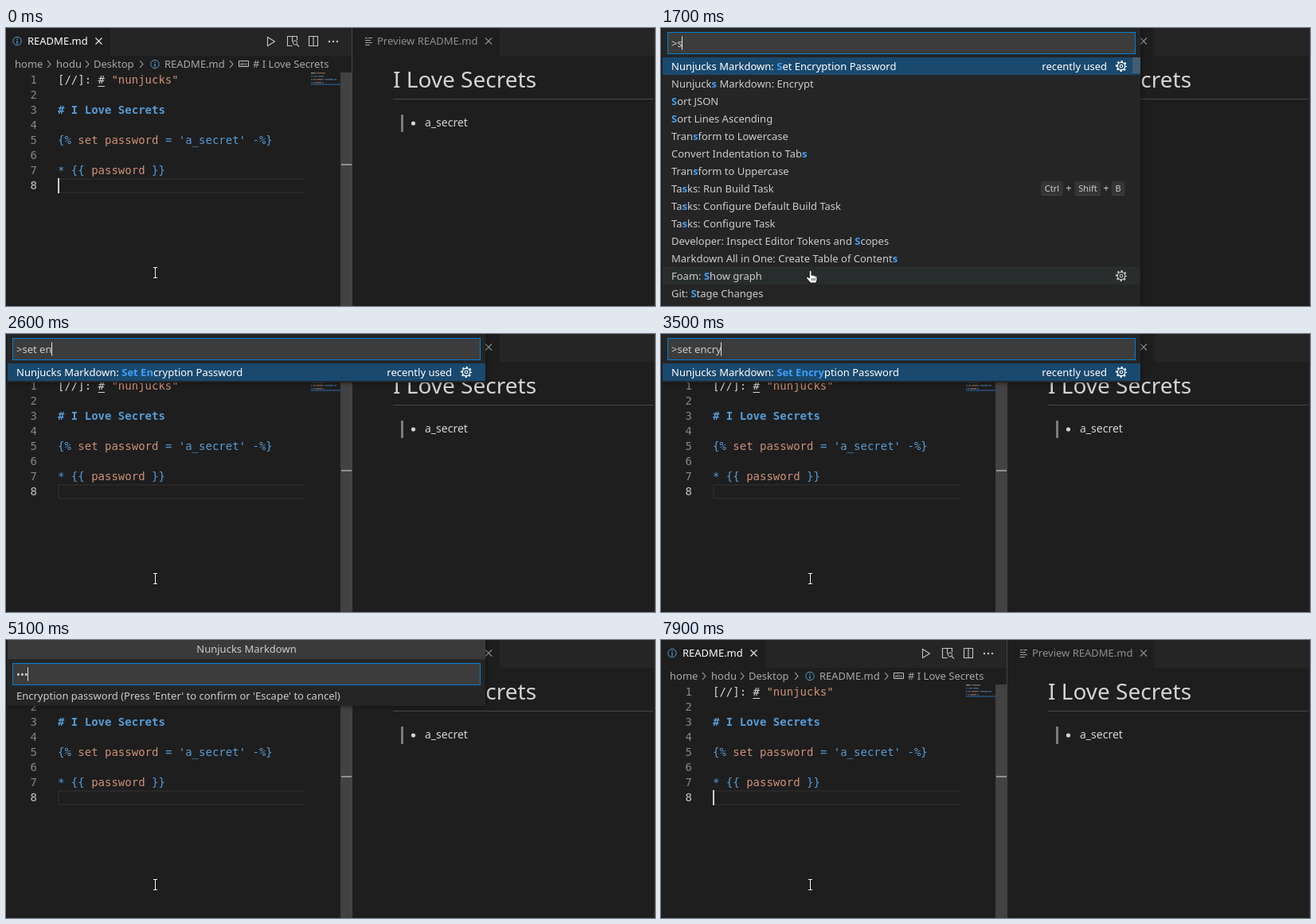
These frames come from a looping animation (815x350 px, 8000 ms). An HTML page:

```html
<!DOCTYPE html>
<html lang="en">
<head>
<meta charset="utf-8">
<title>Editor with command palette</title>
<style>
  html, body { margin: 0; width: 100%; height: 100%; overflow: hidden; background: #1e1e1e; }
  svg { display: block; width: 100%; height: 100%; }
  text { font: 13px "Noto Sans", sans-serif; fill: #ccc; white-space: pre; }
  .code { font: 14px "DejaVu Sans Mono", monospace; }
  .key { font-size: 11px; text-anchor: middle; }
  .hl { font-weight: 700; fill: #409ff8; }
  .line { fill: none; stroke: #c5c5c5; }
  .shadow { filter: drop-shadow(0 0 3px rgba(0, 0, 0, .6)); }
</style>
</head>
<body>
<svg id="stage" viewBox="0 0 815 350" xmlns="http://www.w3.org/2000/svg">
  <clipPath id="inside"><rect x="2" width="813" height="350"/></clipPath>
  <g id="base"></g>
  <g id="overlay" clip-path="url(#inside)"></g>
  <g id="pointer"></g>
</svg>
<script>
const LOOP = 8000;
const $ = id => document.getElementById(id);
const BLUE = '#569cd6', TAN = '#ce9178', PLAIN = '#d4d4d4', DIM = '#a9a9a9', TAB = '#8e8e8e';

const rect = (x, y, w, h, fill, extra = '') =>
  `<rect x="${x}" y="${y}" width="${w}" height="${h}" fill="${fill}" ${extra}/>`;
const text = (x, y, s, fill = '#ccc', extra = '') =>
  `<text x="${x}" y="${y}" style="fill:${fill}" ${extra}>${s}</text>`;
const line = (d, color = '#c5c5c5', w = 1, extra = '') =>
  `<path class="line" d="${d}" style="stroke:${color};stroke-width:${w}" ${extra}/>`;
const span = ([s, color]) => `<tspan fill="${color}">${s}</tspan>`;
const cross = (x, y, color) => line(`M${x - 4} ${y - 4}l8 8m0-8l-8 8`, color, 1.1);
const chevron = x => line(`M${x - 2} 41l4 4.5l-4 4.5`, DIM, 1.1);
const info = (x, y) =>
  `<circle class="line" cx="${x}" cy="${y}" r="5.2" style="stroke:#519fd0"/>` +
  line(`M${x} ${y - 3}v1.4m0 1v4`, '#519fd0', 1.3);

/* ---------- editor ---------- */

const code = {
  1: [['[//]: # ', PLAIN], ['"nunjucks"', TAN]],
  3: [['# I Love Secrets', BLUE]],
  5: [['{% ', BLUE], ['set password ', TAN], ["= 'a_secret' -%}", BLUE]],
  7: [['* {{ ', BLUE], ['password ', TAN], ['}}', BLUE]]
};

function codeLines() {
  let out = '';
  for (let n = 1; n <= 8; n++) {
    const y = 51 + 19 * n, top = 54 + 2 * n;
    out += text(39, y, n, n === 8 ? '#c6c6c6' : '#858585', 'class="code" text-anchor="end"');
    if (!code[n]) continue;
    out += text(65, y, code[n].map(span).join(''), PLAIN,
      `class="code" ${n === 3 ? 'font-weight="700" style="font-weight:700"' : ''}`);
    let x = 383;
    for (const [s, color] of code[n]) {
      for (const word of s.split(/( )/)) {
        if (word.trim()) out += rect(x, top, word.length, 1.5, color, 'opacity=".55"');
        x += word.length;
      }
    }
  }
  return out;
}

function toolbar() {
  return line('M328.5 11.5v11l9-5.5z', '#c5c5c5', 1.1) +
    line('M359.5 22.5h-6v-12h12v5M359.5 10.5v7', '#c5c5c5', 1.1) +
    '<circle class="line" cx="363" cy="18.5" r="2.6"/>' + line('M365 20.5l3 3', '#c5c5c5', 1.1) +
    line('M380.5 10.5h11v12h-11zM386 10.5v12', '#c5c5c5', 1.1) +
    [406, 411, 416].map(x => `<circle cx="${x}" cy="17" r="1.2" fill="#c5c5c5"/>`).join('');
}

function breadcrumb() {
  return text(11, 50, 'home', DIM) + chevron(54) + text(63, 50, 'hodu', DIM) + chevron(102) +
    text(110, 50, 'Desktop', DIM) + chevron(170) + info(187, 45.5) +
    text(199, 50, 'README.md', DIM) + chevron(283) +
    line('M292.5 41.5h12v7h-12z') +
    text(298.5, 47, 'abc', '#c5c5c5', 'text-anchor="middle" font-size="6" class="tiny"') +
    text(310, 50, '# I Love Secrets', DIM);
}

function preview() {
  return rect(435, 0, 380, 35, '#252526') + rect(435, 0, 185, 35, '#1e1e1e') +
    line('M451 12.5h3m1 0h5M451 15.5h7M451 18.5h9M451 21.5h6', '#a5a5a5') +
    text(466, 21, 'Preview README.md', TAB) + cross(606, 16.5, TAB) +
    text(486, 75, 'I Love Secrets', PLAIN, 'class="title"') +
    rect(486, 89, 327, 1, '#474747') + rect(496, 109, 3, 22, '#7b7b7b') +
    '<circle cx="511.5" cy="120" r="2.6" fill="#d4d4d4"/>' +
    text(526, 124, 'a_secret', PLAIN, 'class="body"') + rect(814, 0, 1, 350, '#303030');
}

const editor = () =>
  rect(0, 0, 815, 350, '#1e1e1e') + rect(131, 0, 304, 35, '#252526') +
  info(14, 16.5) + text(27, 21, 'README.md', '#fff') + cross(116.5, 16.5, '#e8e8e8') +
  toolbar() + breadcrumb() +
  line('M375 190H66V207H375', '#282828', 2) + codeLines() + rect(115.5, 73, 8.5, 1, PLAIN) +
  rect(383, 70, 37, 2, '#264f78', 'opacity=".8"') +
  rect(420, 56, 15, 294, '#424242') + rect(421, 171, 13, 2, '#8f8f8f') +
  rect(434, 0, 1, 350, '#444') + preview();

/* ---------- palette ---------- */

const mark = s => s.replace(/\[(.+?)\]/g, '<tspan class="hl">$1</tspan>');
const panel = h => rect(2, -10, 600, h + 10, '#252526', 'class="shadow"');
const field = (y, value) =>
  rect(8.5, y + .5, 587, 27, '#3c3c3c', 'stroke="#007fd4"') +
  `<text id="typed" x="13" y="${y + 19}">${value}</text>` +
  `<rect id="caret" y="${y + 5.5}" width="1" height="17" fill="#e0e0e0"/>`;

const gear = (y, color) => `<g class="line" style="stroke:${color}" transform="translate(578 ${y})">
  <circle r="6" stroke-width="2" stroke-dasharray="2.36" stroke-dashoffset="1.18"/>
  <circle r="4.7" stroke-width="1.2"/><circle r="1.8" stroke-width="1.1"/></g>`;

const cap = (cx, y, w, s) =>
  rect(cx - w / 2, y - 9, w, 18, '#353536', 'rx="3"') +
  rect(cx - w / 2 + 1, y + 8, w - 2, 1, '#444') + text(cx, y + 4, s, '#ccc', 'class="key"');
const plus = (x, y) => text(x, y + 4, '+', '#ccc', 'text-anchor="middle"');
const chord = {
  I: y => cap(495, y, 28, 'Ctrl') + plus(515.5, y) + cap(539, y, 33, 'Shift') + plus(562, y) + cap(576, y, 16, 'I'),
  B: y => cap(491, y, 28, 'Ctrl') + plus(512, y) + cap(536, y, 33, 'Shift') + plus(559, y) + cap(574, y, 17, 'B'),
  D: y => cap(425, y, 28, 'Ctrl') + plus(446, y) + cap(461, y, 18, 'D')
};
const keyOf = s => /^Format Doc/.test(s) ? 'I' : /Run Build/.test(s) ? 'B' : /Next Find/.test(s) ? 'D' : '';

// `split` is the row that opens the second group, `slider` the scrollbar length
function palette(value, rows, { split = 0, slider = 0, fade = 1 } = {}) {
  let out = panel(rows.length > 1 ? 360 : 61) + field(5, value) + rect(2, 37, 600, 22, '#19496f');
  rows.forEach((s, i) => {
    const mid = 48 + 22 * i, first = split && i === split;
    if (i === 12) out += rect(2, mid - 11, 600, 22, '#2a2d2e') + gear(mid, '#c5c5c5');
    if (first) out += rect(2, mid - 11, 600, 1, '#3f3f46') + text(584, mid + 6, 'other commands', '#3f94f5', 'text-anchor="end"');
    const y = mid + (first ? 1 : 0), key = keyOf(s.replace(/[\[\]]/g, ''));
    out += text(13, y + 5, mark(s), i ? '#ccc' : '#fff');
    if (key) out += chord[key](y);
  });
  out += text(560, 53, 'recently used', '#fff', 'text-anchor="end"') + gear(48, '#fff');
  if (slider) out += rect(592, 37, 10, slider, '#797979', `opacity="${.45 * fade}"`);
  return out;
}

const prompt = n =>
  panel(83) + rect(2, 0, 600, 24, '#3a3a3b') +
  text(302, 16, 'Nunjucks Markdown', '#ccc', 'text-anchor="middle"') + field(29, '•'.repeat(n)) +
  text(13, 75, "Encryption password (Press 'Enter' to confirm or 'Escape' to cancel)");

const top1 = hit => 'Nunjucks Markdown: ' + 'Set Encryption Password'.replace(hit, '[$&]');
const recent = `${top1('')}|Format Document|Nunjucks Markdown: Encrypt|Sort JSON|Sort Lines Ascending
|Transform to Lowercase|Convert Indentation to Tabs|Transform to Uppercase|Tasks: Run Build Task
|Tasks: Configure Default Build Task|Tasks: Configure Task|Developer: Inspect Editor Tokens and Scopes
|Markdown All in One: Create Table of Contents|Foam: Show graph`
  .replace(/\n/g, '').replace('[]', '').split('|');
const withS = recent.filter(s => /s/i.test(s)).map(s =>
  s.replace(/\bS|s/, m => m).replace(/\bS/.test(s) ? /\bS/ : /s/, '[$&]')).concat('Git: [S]tage Changes');
const withSet = `${top1('Set')}|Add [Se]lection [T]o Next Find Match|Add [Se]lection [T]o Previous Find Match
|C/C++: Generate EditorConfig contents from VC Format [set]tings|C/C++: Re[set] IntelliSense Database
|CMake: Re[set] CMake Tools Extension State (For troubleshooting)
|Developer: Generate Color Theme From Current [Set]tings|Developer: Re[set] Welcome Page Walkthrough Progress
|Developer: [Set] Log Level...|Editor Font Zoom Re[set]|ESLint: Migrate [Set]tings|Foam: [Set] log level
|Git: [Set] Log Level...|Go: Extract Language [Se]rver Logs [T]o Editor`
  .replace(/\n/g, '').split('|');
const withSe = [top1('Se'), 'Transform to Lowerca[se]', 'Transform to Upperca[se]',
  ...withSet.slice(1, 12).map(s => s.replace(/\[(se)t\]/i, '[$1]t').replace('[T]', 'T'))];
const withSpace = withSet.filter(s => !/\]tings|Zoom/.test(s)).concat(
  'Notebook: Re[set] Cell Toolbar', 'Terminal: [Set] Fixed Dimensions',
  'View: Re[set] View Locations', 'Views: Re[set] Focused View Location');

/* ---------- timeline ---------- */

const idle = on => on ? rect(65, 189, 2, 19, '#d0d0d0') : '';
const one = (value, hit) => palette(value, [top1(hit)]);
const steps = [
  [0, () => idle(1)], [400, () => idle(0)], [900, () => idle(1)],
  [1100, () => palette('&gt;', recent, { slider: 20, fade: .25 })],
  [1200, () => palette('&gt;', recent, { slider: 20 })],
  [1700, () => palette('&gt;s', withS, { slider: 20 })],
  [1900, () => palette('&gt;se', withSe, { split: 3, slider: 80 })],
  [2100, () => palette('&gt;set', withSet, { split: 1, slider: 207 })],
  [2300, () => palette('&gt;set ', withSpace, { split: 1, slider: 320 })],
  [2400, () => palette('&gt;set e', withSpace, { split: 1, slider: 320 })],
  ...[2600, 2900, 3200, 3500].map((t, i) => {
    const typed = 'Set Encry'.slice(0, 6 + i);
    return [t, () => one('&gt;' + typed.toLowerCase(), typed)];
  }),
  ...[4100, 4700, 5000, 5100, 5400, 5700, 5800, 6100, 6500].map((t, i) => [t, () => prompt(i)]),
  [6900, () => idle(1)], [7400, () => idle(0)], [7900, () => idle(1)]
];

const beam = line('M185 301.5h5m-2.5 0v13m-2.5 0h5', '#111', 2.4) + line('M185 301.5h5m-2.5 0v13m-2.5 0h5', '#fff');
const hand = `<path d="M186.3 307c0-2 2.7-2 2.7 0v4.4c1-.8 2.3-.4 2.4.5c1-.6 2.2-.2 2.3.7c1-.5 2.2 0 2.2 1.2
  v3.6l-1.2 3.6h-7l-4.6-5.6c-1-1.5 .8-2.8 2-1.6l1.2 1.2z" fill="#fff" stroke="#111" stroke-width=".9"/>` +
  line('M189.3 315v3m2-3v3m2-3v3', '#111', .7);

let shown = -1;
function draw(now) {
  const t = now % LOOP;
  let i = steps.length - 1;
  while (steps[i][0] > t) i--;
  if (i !== shown) {
    shown = i;
    $('overlay').innerHTML = steps[i][1]();
    $('pointer').innerHTML = t >= 1100 && t < 2600 ? hand : beam;
    const typed = $('typed');
    if (typed) $('caret').setAttribute('x', Math.floor(13 + typed.getComputedTextLength()));
  }
  requestAnimationFrame(draw);
}

$('base').innerHTML = editor();
for (const [name, size] of [['tiny', 6], ['title', 28], ['body', 14]])
  $('base').querySelector('.' + name).style.fontSize = size + 'px';
$('base').querySelectorAll('[font-weight]').forEach(el => el.style.fontWeight = 700);
const start = performance.now();
requestAnimationFrame(now => draw(Math.max(0, now)));
</script>
</body>
</html>
```
